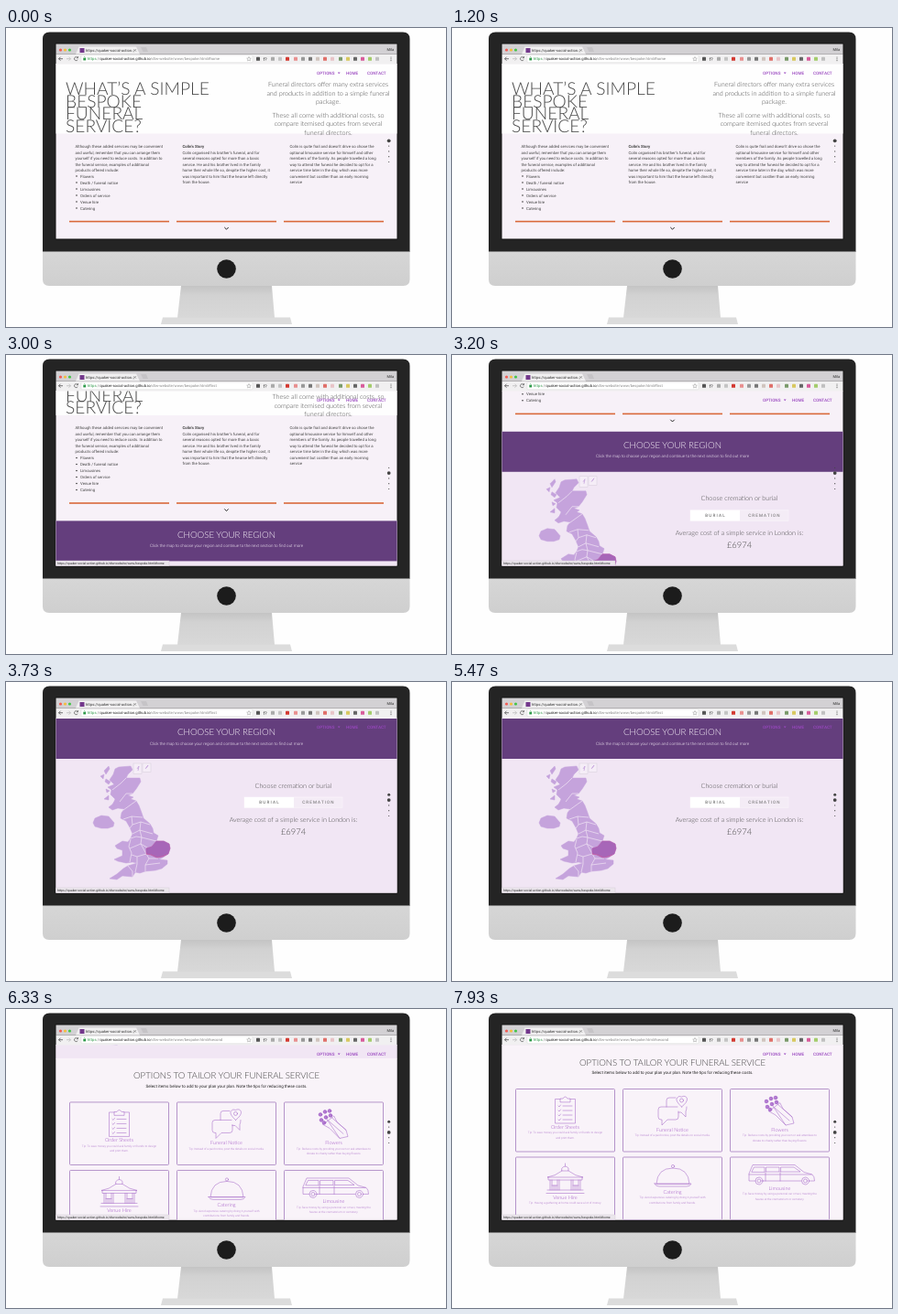
An HTML page that plays this animation: 480 by 327 pixels, repeating every 8000 ms.

```html
<!DOCTYPE html>
<html lang="en">
<head>
<meta charset="utf-8">
<title>Funeral planner on a desktop screen</title>
<style>
  html, body { margin: 0; width: 100%; height: 100%; overflow: hidden; background: #fefefe; }
  svg { display: block; width: 100vw; height: 100vh; }
  text { font-family: Roboto, sans-serif; text-rendering: geometricPrecision; white-space: pre; }
  .lato { font-family: Lato, sans-serif; font-weight: 300; }
  .light { font-weight: 300; }
  .bold { font-weight: 700; }
  .mid { text-anchor: middle; }
  .icon { fill: none; stroke: #a56ac8; stroke-width: .55; stroke-linejoin: round; stroke-linecap: round; }
</style>
</head>
<body>
<svg viewBox="0 0 480 327">
  <defs>
    <clipPath id="screen"><path d="M54.500 39H426.500V230.500H54.500Z"/></clipPath>
    <linearGradient id="chin" x2="0" y2="1"><stop stop-color="#d6d6d6"/><stop offset="1" stop-color="#cfcfcf"/></linearGradient>
    <linearGradient id="neck" x2="0" y2="1"><stop stop-color="#c4c4c4"/><stop offset=".3" stop-color="#d2d2d2"/><stop offset="1" stop-color="#d8d8d8"/></linearGradient>
  </defs>
  <path d="M191 282H290L293 317H187Z" fill="url(#neck)"/>
  <path d="M171 316.5H310L312 324H169Z" fill="#dcdcdc"/>
  <path d="M40 245V12Q40 4.500 47.500 4.500H433Q440.500 4.500 440.500 12V245Z" fill="#242424"/>
  <path d="M40 244.500H440.500V275Q440.500 282 433.500 282H47Q40 282 40 275Z" fill="url(#chin)"/>
  <circle cx="240.500" cy="263.500" r="10.300" fill="#1c1c1c"/>
  <path d="M54 17H427V231H54Z" fill="#111" stroke="#151515"/>
  <g clip-path="url(#screen)">
    <rect x="54" y="39" width="373" height="192" fill="#f7f1f8"/>
    <g id="page"></g>
    <g id="fixed"></g>
  </g>
  <g id="browser"></g>
</svg>
<script>
const $ = id => document.getElementById(id);
const SECTION = 191, GREY = '#484848', PURPLE = '#9a48c0';
const SITE = 'quaker-social-action.github.io', PATH = '/dtw-website/www/bespoke.html';
const COLUMNS = [69, 186, 303];

// y is the middle of the capitals
const text = (x, y, size, str, fill = GREY, cls = '', extra = '') =>
  `<text x="${x}" y="${(y + size * .36).toFixed(2)}" font-size="${size}" fill="${fill}" class="${cls}" ${extra}>${str}</text>`;
const lines = (x, y, step, size, rows, ...style) =>
  rows.map((row, i) => text(x, y + i * step, size, row, ...style)).join('');
const rect = (x, y, w, h, fill, extra = '') =>
  `<rect x="${x}" y="${y}" width="${w}" height="${h}" fill="${fill}" ${extra}/>`;
const circle = (x, y, r, fill, extra = '') =>
  `<circle cx="${x}" cy="${y}" r="${r}" fill="${fill}" ${extra}/>`;
const path = (d, fill, extra = '') => `<path d="${d}" fill="${fill}" ${extra}/>`;

function bespokeSection() {
  const bullets = ['Flowers', 'Death / funeral notice', 'Limousines', 'Orders of service', 'Venue hire', 'Catering'];
  return rect(54, 39, 373, 76.5, '#fefefe') +
    lines(65, 66.5, 13.4, 19.2, ['WHAT’S A SIMPLE', 'BESPOKE', 'FUNERAL', 'SERVICE?'], GREY, 'lato') +
    lines(351.5, 61.5, 9.7, 7.2, ['Funeral directors offer many extra services',
      'and products in addition to a simple funeral', 'package.'], GREY, 'lato mid') +
    lines(351.5, 95, 9.7, 7.2, ['These all come with additional costs, so',
      'compare itemised quotes from several', 'funeral directors.'], GREY, 'lato mid') +
    lines(75.5, 129.5, 6.5, 4.3, ['Although these added services may be convenient',
      'and useful, remember that you can arrange them', 'yourself if you need to reduce costs. In addition to',
      'the funeral service, examples of additional', 'products offered include:'], '#444') +
    bullets.map((b, i) => circle(77, 162 + i * 7, .75, '#222') + text(81, 162 + i * 7, 4.3, b, '#444')).join('') +
    text(192.5, 129.5, 4.3, 'Colin’s Story', '#444', 'bold') +
    lines(192.5, 136, 6.5, 4.3, ['Colin organised his brother’s funeral, and for',
      'several reasons opted for more than a basic', 'service. He and his brother lived in the family',
      'home their whole life so, despite the higher cost, it', 'was important to him that the hearse left directly',
      'from the house.'], '#444') +
    lines(309.5, 129.5, 6.5, 4.3, ['Colin is quite frail and doesn’t drive so chose the',
      'optional limousine service for himself and other', 'members of the family. As people travelled a long',
      'way to attend the funeral he decided to opt for a', 'service time later in the day, which was more',
      'convenient but costlier than an early morning', 'service'], '#444') +
    COLUMNS.map(x => rect(x, 210.8, 109, 1.6, '#d9693a')).join('') +
    path('M238.3 218L240.5 220.2 242.7 218', 'none', 'stroke="#222" stroke-width="1"');
}

function map() {
  const mainland = 'M123 93L136 92 138 96 133 101 131 105 146 105 147 109 142 117 138 122 133 124 139 126 136 128 142 130 ' +
    '145 135 148 143 150 149 157 155 160 160 161 165 166 168 164 174 172 174 178 177 179 182 177 188 171 192 167 194 ' +
    '176 195 176 199 170 204 163 206 152 207 146 209 141 208 138 213 127 212 121 216 113 215 121 210 128 204 133 201 ' +
    '143 198 138 197 131 198 122 196 118 194 127 190 127 184 121 182 119 179 127 174 133 175 136 171 138 166 135 159 ' +
    '131 152 125 149 126 143 129 139 122 138 116 140 112 137 117 133 119 128 114 123 115 118 111 115 118 112 113 107 117 101 119 95Z';
  const islands = 'M97 149L104 146 112 147 118 154 117 158 111 160 104 160 97 158 95 154Z' +
    'M107 97L112 92 113 95 109 101ZM103 103L107 101 106 106ZM109 106L114 109 112 112 108 109ZM109 117L113 119 110 121ZM107 128L112 124 112 129ZM116 134L118 131 118 136Z';
  const borders = 'M128 140L135 135 142 130M128 150L137 147 149 148M137 147L138 156 135 160M138 156L147 153 157 156M138 166L146 162 160 166' +
    'M147 153L146 162 148 170 164 174M136 171L142 169 148 170 147 177 154 181M136 172L134 180 137 187 135 197M135 182L147 177 153 188 143 191 137 189' +
    'M143 191L143 199 141 208M153 188L156 193 166 193M156 193L152 200 152 207M152 200L168 198M133 201L138 207 138 213M124 131L131 122 138 122M116 118L125 111 131 105';
  const east = 'M153 182L159 180 164 174 172 174 178 177 179 182 177 188 171 191 164 192 158 189 153 188Z';
  return path(mainland + islands, '#c5a3dc', 'stroke="#c5a3dc" stroke-width=".5" stroke-linejoin="round"') +
    path(borders, 'none', 'stroke="#f1e6f4" stroke-width=".7"') +
    path(east, '#a766b8', 'stroke="#b65cab" stroke-width=".6"') +
    path('M153 188L159 189 166 192 175 189', 'none', 'stroke="#d0609c" stroke-width=".8" stroke-dasharray="1.5 1"') +
    rect(139, 89, 9, 11.5, '#f5edf7', 'stroke="#d6cdda" stroke-width=".5"') +
    rect(149, 89, 9, 9.5, '#f5edf7', 'stroke="#d6cdda" stroke-width=".5"') +
    path('M143 95L145 92 144 97M152 95L155 91 153 94', 'none', 'stroke="#c5a3dc" stroke-width=".8"');
}

function regionSection() {
  return rect(54, 40, 373, SECTION, '#f1e6f4') + rect(54, 40, 373, 44, '#643e7d') +
    text(240.5, 55, 9.7, 'CHOOSE YOUR REGION', '#faf4fb', 'lato mid') +
    text(240.5, 67, 4.5, 'Click the map to choose your region and continue to the next section to find out more', '#faf4fb', 'light mid') +
    map() +
    text(313.5, 113, 7.2, 'Choose cremation or burial', GREY, 'lato mid') +
    rect(260, 126, 107, 11.5, '#f4ecf6', 'stroke="#faf6fb" stroke-width=".6"') + rect(260, 126, 54, 11.5, '#fff') +
    text(287.5, 131.8, 4.6, 'BURIAL', '#555', 'mid', 'letter-spacing="1.2"') +
    text(341, 131.8, 4.6, 'CREMATION', '#666', 'mid', 'letter-spacing="1.1"') +
    text(313.5, 150.3, 7.2, 'Average cost of a simple service in London is:', GREY, 'lato mid') +
    text(313.5, 163.7, 9.4, '£6974', GREY, 'lato mid');
}

const icons = {
  clipboard: () => path('M118 98.500H112.500V125H134.500V98.500H129M118 101.500V98H121Q123.500 94 126 98H129V101.500Z', 'none') +
    [106, 111, 116, 121].map(y => path(`M116 ${y}l1 1 1.500 -2M121 ${y}H131`, 'none')).join(''),
  bubbles: () => path('M246 107H228Q225 107 225 110V118Q225 121 228 121H229V127L235 121H244Q247 121 247 118V112', 'none') +
    path('M244 97H237Q234 97 234 100V107M247 113H250L255 118V112Q256 110 256 107', 'none') +
    path('M250.500 107Q244 101 245 98Q247 94 250.500 96Q255 94 256.500 98Q257 102 250.500 107Z', 'none') + circle(250.5, 100, 2, 'none'),
  flowers: () => [[343, 101], [348, 98], [353, 97], [344, 107], [349, 104], [354, 102], [347, 110]]
      .map(([x, y]) => circle(x, y, 1.9, '#a867cc') + circle(x, y, .7, '#f8f2f9')).join('') +
    path('M346 112L353 116 364 127 373 125 371 118 361 109 358 103ZM350 106L364 127M355 104L371 118M352 108L368 122', 'none'),
  gazebo: () => path('M123.500 169V172M120 174Q123.500 170 127 174V177H120ZM120 177Q112 183 104 184H143Q135 183 127 177M105 184V187H142V184M104 198H143M103 201.500H144', 'none') +
    [107, 115, 130, 138].map(x => path(`M${x} 187V198M${x + 2} 187V198`, 'none')).join('') +
    path('M109 193H115M132 193H138M111 193V198M113 193V198M134 193V198M136 193V198', 'none'),
  cloche: () => path('M223 191Q224 174 241 174Q258 174 259 191ZM221 191H261Q260 194 256 194H226Q222 194 221 191Z', 'none') +
    circle(241, 172, 1.6, 'none'),
  limousine: () => path('M331 188H324V180L328 170.500H374L384 178.500 393 181Q395.500 183 395.500 188H390M339 188H381', 'none') +
    path('M327 178L329.500 173H341V178ZM343 173H357V178H343ZM359 173H373L380 178H359ZM324 181H392M342 178V188M358 178V188', 'none') +
    [335, 385.5].map(x => circle(x, 188, 4, 'none') + circle(x, 188, 2, 'none')).join('')
};

const cards = [
  ['Order Sheets', 129, 'clipboard', 'Tip: To save money you could ask family or friends to design', 'and print them.'],
  ['Funeral Notice', 132, 'bubbles', 'Tip: Instead of a paid notice, post the details on social media.'],
  ['Flowers', 132, 'flowers', 'Tip: Reduce costs by providing your own or ask attendees to', 'donate to charity rather than buying flowers.'],
  ['Venue Hire', 206, 'gazebo', 'Tip: Having a gathering at home could save a lot of money.'],
  ['Catering', 200, 'cloche', 'Tip: Avoid expensive catering by doing it yourself with', 'contributions from family and friends.'],
  ['Limousine', 196, 'limousine', 'Tip: Save money by using a personal car or taxi, meeting the', 'hearse at the crematorium or cemetery.']
];

function optionsSection() {
  return rect(54, 39.5, 373, SECTION + 20, '#f9f3f9') +
    text(240.5, 58.3, 9.65, 'OPTIONS TO TAILOR YOUR FUNERAL SERVICE', '#444', 'lato mid') +
    text(240.5, 69.5, 4.55, 'Select items below to add to your plan your plan. Note the tips for reducing these costs.', '#222', 'mid') +
    cards.map(([title, y, icon, ...tips], i) => {
      const x = COLUMNS[i % 3], top = i < 3 ? 87.5 : 162;
      return rect(x + .5, top, 108, 68.5, '#f9f3f9', 'rx="1" stroke="#a47cbe" stroke-width=".8"') +
        `<g class="icon">${icons[icon]()}</g>` +
        text(x + 54.5, y, 5.5, title, PURPLE, 'lato mid') +
        lines(x + 54.5, y + 6.3, 5.4, 3.1, tips, '#a566c4', 'light mid');
    }).join('');
}

function browserFrame() {
  const addons = [[275, '#555'], [291, '#aaa'], [299, '#c4c4c4'], [307, '#d33a32'], [316, '#e89090'], [324, '#999'], [332, '#777'],
    [340, '#d0c4be'], [348, '#e0706a'], [356, '#e8c4c8'], [365, '#7a9a6a'], [373, '#d8c860'], [381, '#666'], [389, '#d85c9c'], [397, '#a4cc6c'], [405, '#c0c0c0']];
  return rect(54.5, 17.5, 372, 11, '#d3d1d4') + rect(54.5, 28.5, 372, 11, '#f1f0f1') +
    ['#f25c54', '#f5bd3d', '#45c44a'].map((c, i) => circle(59.5 + i * 5, 24, 1.6, c)).join('') +
    path('M76 28.500L79.500 20.500H142L146 28.500Z', '#f1f0f1') +
    path('M147 21H153L155 26H149.500Z', '#c6c4c7') +
    rect(80.5, 22, 5, 5, '#74398c') +
    text(87, 24.5, 4.1, 'https://quaker-social-action.', '#333') + text(138, 24.5, 4.1, 'g', '#bbb') +
    path('M139.500 23.200l2.400 2.400m0 -2.400l-2.400 2.400', 'none', 'stroke="#666" stroke-width=".6"') +
    text(415.5, 23.5, 4.1, 'Mila', '#333') +
    path('M62 33.700H57.500M59.500 31.700L57.500 33.700 59.500 35.700', 'none', 'stroke="#555" stroke-width=".8"') +
    path('M66 33.700H70.500M68.500 31.700L70.500 33.700 68.500 35.700', 'none', 'stroke="#bbb" stroke-width=".8"') +
    path('M78 32.300A2 2 0 1 0 78.300 34.500M78.500 31V32.700H76.800', 'none', 'stroke="#555" stroke-width=".7"') +
    rect(82, 29.8, 187, 8, '#fff', 'rx="1" stroke="#d0cfd0" stroke-width=".4"') +
    rect(84.3, 33, 2.8, 2.4, '#2f9a4a') + path('M85 33V32Q85.700 30.800 86.400 32V33', 'none', 'stroke="#2f9a4a" stroke-width=".5"') +
    text(89, 33.8, 4.2, `<tspan fill="#2f9a4a">https</tspan>://<tspan fill="#222">${SITE}</tspan>${PATH}<tspan id="hash"></tspan>`, '#888') +
    path('M265 31.500l.7 1.500 1.600 .2 -1.200 1.100 .3 1.600 -1.400 -.8 -1.400 .8 .3 -1.600 -1.200 -1.100 1.600 -.2Z', 'none', 'stroke="#777" stroke-width=".4"') +
    text(280.5, 33.8, 5, 'f?', '#333') +
    addons.map(([x, c]) => rect(x - 2, 31.8, 4, 4, c, 'rx=".6"')).join('') +
    [32, 33.8, 35.6].map(y => circle(420, y, .6, '#666')).join('');
}

$('page').innerHTML = [bespokeSection, regionSection, optionsSection]
  .map((section, i) => `<g transform="translate(0 ${i * SECTION})">${section()}</g>`).join('');
$('fixed').innerHTML =
  [[339, 'OPTIONS'], [371, 'HOME'], [394, 'CONTACT']].map(([x, s]) => text(x, 49.2, 4.6, s, PURPLE, '', 'font-weight="500"')).join('') +
  path('M361.800 48.500H364.600L363.200 50.200Z', PURPLE) +
  [0, 1, 2, 3, 4].map(i => circle(417.7, 123.3 + i * 5.8, .6, '#444', 'class="dot"')).join('') +
  `<g id="status">${rect(54, 225, 124, 6, '#ebe6ec', 'stroke="#cfc8d2" stroke-width=".4"')}${text(56, 227.8, 3.4, `https://${SITE}${PATH}#home`, '#222')}</g>`;
$('browser').innerHTML = browserFrame();

const dots = document.querySelectorAll('.dot');
const LOOP = 8000, SCROLL = 700, STARTS = [2872, 5865];

// cubic-bezier(.25, .1, .25, 1), solved for x by bisection
function ease(x) {
  if (x <= 0 || x >= 1) return x <= 0 ? 0 : 1;
  const curve = (s, a, b) => 3 * s * (1 - s) ** 2 * a + 3 * s * s * (1 - s) * b + s ** 3;
  let lo = 0, hi = 1;
  for (let i = 0; i < 20; i++) {
    const s = (lo + hi) / 2;
    if (curve(s, .25, .25) < x) lo = s; else hi = s;
  }
  return curve(lo, .1, 1);
}

function draw(now) {
  const t = now % LOOP;
  const scroll = STARTS.reduce((sum, start) => sum + SECTION * ease((t - start) / SCROLL), 0);
  const active = STARTS.filter(start => t >= start).length;
  $('page').setAttribute('transform', `translate(0 ${-scroll.toFixed(2)})`);
  $('hash').textContent = ['#home', '#first', '#second'][active];
  $('status').style.display = active ? '' : 'none';
  const hover = t > 3400;
  dots.forEach((dot, i) => dot.setAttribute('r', i === active ? 1.9 : i === 0 && hover ? 1.5 : .6));
  requestAnimationFrame(draw);
}
requestAnimationFrame(draw);
</script>
</body>
</html>
```
